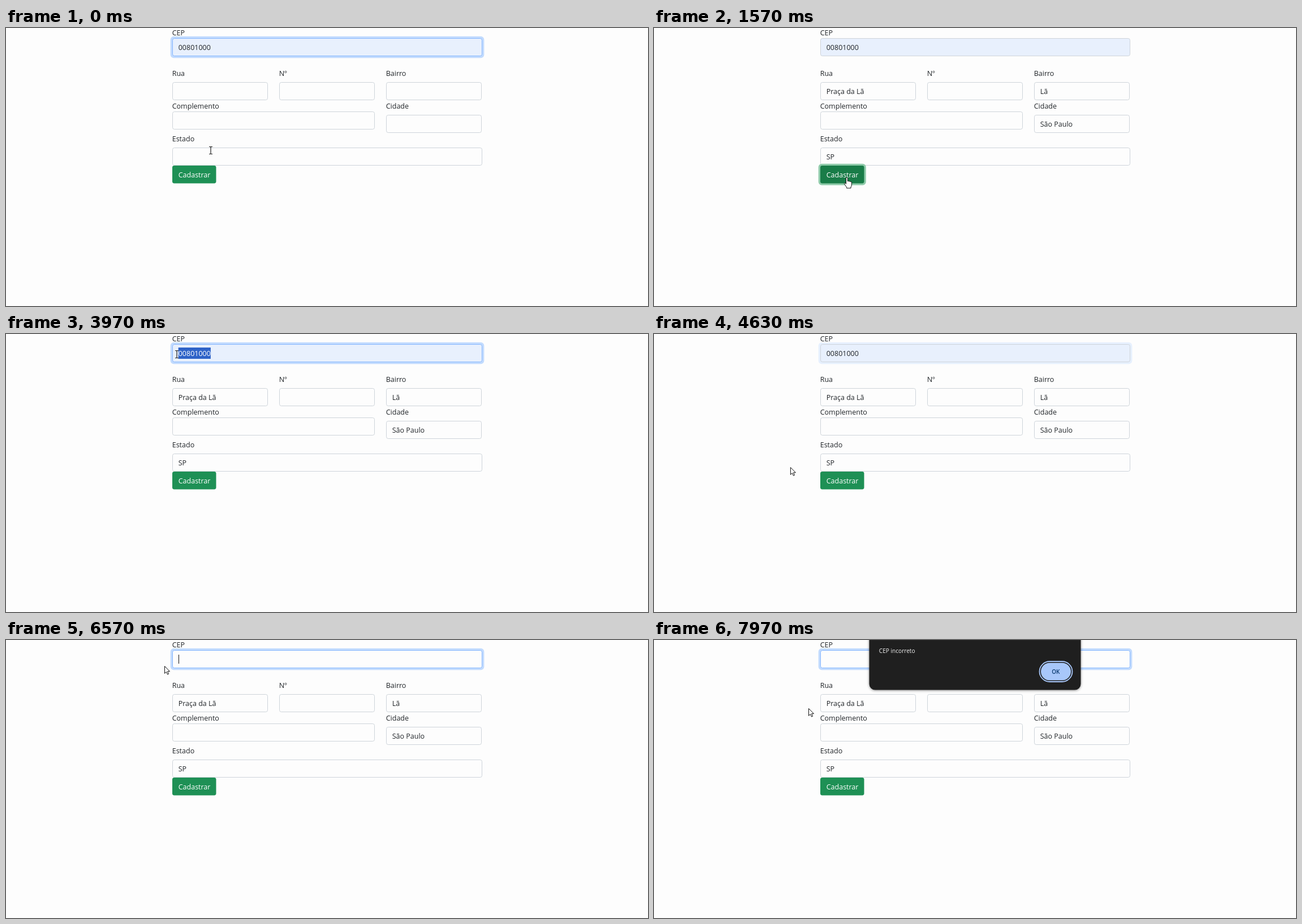
These frames come from a looping animation (1135x493 px, 8 s). An HTML page:

```html
<!DOCTYPE html>
<html lang="pt-BR">
<head>
<meta charset="utf-8">
<title>Cadastro</title>
<style>
html, body { margin: 0; width: 100%; height: 100%; overflow: hidden; background: #fdfdfd; }
svg { display: block; }
text { font: 12.5px "Open Sans", "Noto Sans", sans-serif; fill: #212529; white-space: pre; }
.field { fill: #fdfdfd; stroke: #ced4da; }
.alert text { font-size: 10.1px; fill: #f1f1f1; }
.alert .ok { font-size: 10px; font-weight: 600; fill: #0b3a70; text-anchor: middle; }
.alert { filter: drop-shadow(0 1px 2px rgba(0, 0, 0, .45)); }
</style>
</head>
<body>
<svg id="stage" width="1135" height="493" viewBox="0 0 1135 493"></svg>
<script>
const LOOP = 8000;
const CEP = '00801000';
const TEXT_X = 304.7, DIGIT = 7.15;
const stage = document.getElementById('stage');

function add(tag, attrs, parent = stage) {
  const el = document.createElementNS('http://www.w3.org/2000/svg', tag);
  for (const k in attrs) el.setAttribute(k, attrs[k]);
  parent.append(el);
  return el;
}
function label(x, y, str, attrs = {}, parent = stage) {
  const el = add('text', { x, y, ...attrs }, parent);
  el.textContent = str;
  return el;
}
const box = (x, y, w, h, attrs, parent) =>
  add('rect', { x, y, width: w, height: h, ...attrs }, parent);
const show = (el, on) => el.setAttribute('opacity', +on);

// Form: label, label baseline, x, y, width, looked-up value
const fields = [
  ['CEP', 13, 294, 18, 548, ''],
  ['Rua', 85, 294, 96, 169, 'Praça da Lã'],
  ['Nº', 85, 483, 96, 169, ''],
  ['Bairro', 85, 672, 96, 169, 'Lã'],
  ['Complemento', 143, 294, 148, 358, ''],
  ['Cidade', 143, 672, 154, 169, 'São Paulo'],
  ['Estado', 201, 294, 212, 548, 'SP'],
];
const ring = box(290.7, 14.7, 554.6, 38.6, { rx: 6, fill: '#c2dbfe' });
const values = [];
const inputs = fields.map(([name, base, x, y, w, value]) => {
  label(x - .3, base, name);
  const el = box(x + .5, y + .5, w - 1, 31, { rx: 3.2, class: 'field' });
  if (value) values.push(label(x + 10.7, y + 21, value));
  return el;
});
const cepInput = inputs[0];

const marked = box(TEXT_X, 24, 0, 20, { fill: '#2f63c8' });
const cepText = label(TEXT_X, 39, '');
const plain = add('tspan', {}, cepText);
const inverse = add('tspan', { fill: '#fff' }, cepText);
const caret = box(0, 26, 1, 16, { fill: '#111' });

const buttonRing = box(290.7, 240.7, 84.1, 38.1, { rx: 6, fill: '#8fcbaa' });
const button = box(294, 244, 77.5, 31.5, { rx: 3.4 });
label(304.7, 264.7, 'Cadastrar', { style: 'fill:#fff' });

const alertBox = add('g', { class: 'alert' });
add('path', { d: 'M380.5 -5H754.5V78a10.5 10.5 0 0 1-10.5 10.5H391a10.5 10.5 0 0 1-10.5-10.5Z', fill: '#1f1f1f' }, alertBox);
label(397.8, 22.5, 'CEP incorreto', {}, alertBox);
box(681.5, 38, 58, 36, { rx: 18, fill: 'none', stroke: '#a8c7fa', 'stroke-width': 1.8 }, alertBox);
box(684, 40.5, 53, 31, { rx: 15.5, fill: '#a8c7fa' }, alertBox);
label(710.3, 59.8, 'OK', { class: 'ok' }, alertBox);

const pointer = add('g', {});
const outline = { fill: '#fff', stroke: '#111', 'stroke-linejoin': 'round' };
const shapes = {
  arrow: add('path', { d: 'M.5 .5V13.3l3-2.8 2 4.6 2.1-.9-2-4.5H9.5Z', ...outline }, pointer),
  beam: add('path', { d: 'M-3-6.5h2.2l.8.8.8-.8H3M0-6V6M-3 6.5h2.2l.8-.8.8.8H3', fill: 'none', stroke: '#222', 'stroke-width': 1.2 }, pointer),
  hand: add('path', {
    d: 'M-1.5 11V1.4a1.4 1.4 0 0 1 2.8 0V6.6q1.3-1 2.5.4 1.4-.8 2.4.5 2-.5 2.2 1.6V13q0 2.4-1.4 4V19H-.4V17.4L-4.3 11.8q-.5-1.6.9-1.8 1 .1 1.9 1.4Z',
    ...outline }, pointer),
};

// Pointer hot spot: time, x, y
const path = [
  [0, 362, 217], [60, 362, 217], [450, 343, 266], [560, 341, 265], [1700, 341, 265],
  [2050, 341, 268], [2530, 341, 265], [2770, 360, 139], [3130, 370, 38], [3420, 370, 38],
  [3800, 302, 36], [4220, 302, 36], [4520, 245, 200], [4720, 238, 262], [4980, 240, 160],
  [5260, 432, 42], [5430, 440, 41], [5580, 436, 41], [5950, 280, 46], [7540, 280, 46],
  [7760, 270, 118], [7880, 273, 121], [8000, 273, 121],
];
function pointerAt(t) {
  let i = 1;
  while (i < path.length - 1 && path[i][0] <= t) i++;
  const [t0, x0, y0] = path[i - 1], [t1, x1, y1] = path[i];
  const u = (t - t0) / (t1 - t0), k = u * u * (3 - 2 * u);
  return [x0 + (x1 - x0) * k, y0 + (y1 - y0) * k];
}

const during = (t, a, b) => t >= a && t < b;
const clamp = v => Math.max(0, Math.min(1, v));
// Focus fades in at a and out at b over 150 ms
const fade = (t, a, b) => clamp((t - a) / 150) * clamp(1 - (t - b) / 150);

const PRESS = 600, FILL = 1080, FOCUS = 3140, BLUR = 4540, REFOCUS = 5270, CLEAR = 6200, ALERT = 7860;

function pickShape(x, y, dragging) {
  const inside = (l, top, w) => x >= l && x <= l + w && y >= top && y <= top + 32;
  if (dragging) return 'beam';
  if (inside(294, 244, 77)) return 'hand';
  return fields.some(f => inside(f[2], f[3], f[4])) ? 'beam' : 'arrow';
}

function draw(t) {
  const [x, y] = pointerAt(t);
  const dragging = during(t, 3420, 3850) || during(t, 5580, 6000);
  const shape = pickShape(x, y, dragging);
  pointer.setAttribute('transform', `translate(${x.toFixed(1)} ${y.toFixed(1)})`);
  for (const k in shapes) show(shapes[k], k === shape);

  const cepFocus = Math.max(fade(t, -200, PRESS), fade(t, FOCUS, BLUR), fade(t, REFOCUS, 9000));
  show(ring, 1);
  ring.setAttribute('opacity', cepFocus);
  cepInput.style.stroke = cepFocus > .5 ? '#86b7fe' : '#ced4da';
  cepInput.style.fill = t < CLEAR ? '#e8f0fd' : '#fdfdfd';

  const selecting = during(t, 3420, BLUR) || during(t, 5580, CLEAR);
  const end = t < CLEAR ? CEP.length : 0;
  const from = selecting ? Math.max(0, Math.min(end, Math.round((x - TEXT_X) / DIGIT))) : end;
  plain.textContent = CEP.slice(0, from);
  inverse.textContent = CEP.slice(from, end);
  marked.setAttribute('x', TEXT_X + from * DIGIT);
  marked.setAttribute('width', (end - from) * DIGIT);

  const since = t >= CLEAR ? t - CLEAR : t >= REFOCUS ? t - REFOCUS : t >= FOCUS ? t - FOCUS : t + 530;
  const focused = t < PRESS || during(t, FOCUS, BLUR) || during(t, REFOCUS, ALERT);
  show(caret, focused && from === end && Math.floor(since / 530) % 2 === 0);
  caret.setAttribute('x', end ? 362 : 305);

  const pressed = fade(t, PRESS, FOCUS);
  buttonRing.setAttribute('opacity', pressed);
  button.setAttribute('fill', shape === 'hand' || pressed > .5 ? '#197c48' : '#1e9055');
  values.forEach(v => show(v, t >= FILL));
  show(alertBox, t >= ALERT);
}

const start = performance.now();
function tick() {
  draw((performance.now() - start) % LOOP);
  requestAnimationFrame(tick);
}
tick();
</script>
</body>
</html>
```
